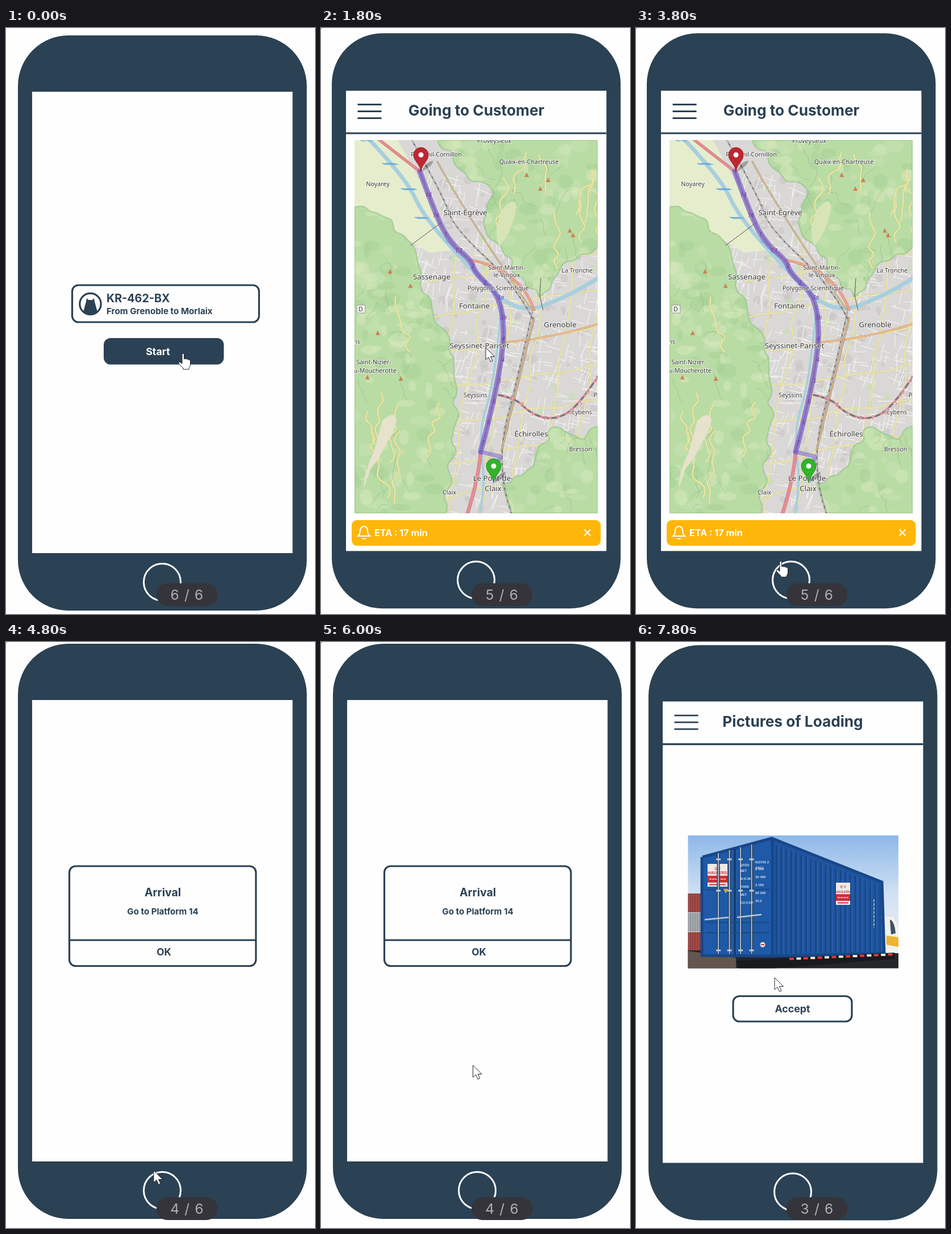
Animation, 544 px wide and 1030 px high, one loop 8000 ms. Source, as an HTML page:

```html
<!DOCTYPE html>
<html lang="en">
<head>
<meta charset="utf-8">
<title>Driver app walkthrough</title>
<style>
html, body { margin: 0; width: 100%; height: 100%; overflow: hidden; background: #fefefe; }
svg { display: block; width: 544px; height: 1030px; }
text { font-family: Inter, sans-serif; font-weight: 650; fill: #2b4154; }
.mid { text-anchor: middle; }
.box { fill: none; stroke: #2b4154; stroke-width: 3.2; }
.badge { font-size: 24.5px; font-weight: 400; letter-spacing: 1.2px; fill: #aeb0b6; text-anchor: middle; }
.map path { fill: none; stroke-linejoin: round; stroke-linecap: round; }
.map text { font: 10.7px "Noto Sans", sans-serif; fill: #3c3c3c; text-anchor: middle; paint-order: stroke; stroke: #ffffffa0; stroke-width: 2px; }
.map .town { font-size: 13.2px; }
.map .road { font-size: 10px; font-style: italic; fill: #c5404d; }
.map .route { font-size: 10px; font-style: italic; fill: #763a9c; stroke: none; }
.photo text { font: 700 6px "Liberation Sans", sans-serif; fill: #d6e3f2; }
.photo .sign { fill: #c8323c; text-anchor: middle; }
</style>
</head>
<body>
<svg id="stage" viewBox="0 0 544 1030"></svg>
<script>
const NAVY = '#2b4154', LOOP = 8000, STEP = 200;

let seed = 11;
const random = () => (seed = (seed * 16807) % 2147483647) / 2147483647;
const between = (a, b) => Math.round((a + (b - a) * random()) * 10) / 10;
const repeat = (n, make) => Array.from({ length: n }, (_, i) => make(i)).join('');
const mix = (a, b, k) => a + (b - a) * k;
const points = s => s.split(' ').map(p => p.split(',').map(Number));

// Smooth curve through the midpoints of a polyline.
function curve(s) {
  const p = points(s), last = p.length - 1;
  let d = `M${p[0]}`;
  for (let i = 1; i < last; i++) {
    const end = i === last - 1 ? p[last] : [mix(p[i][0], p[i + 1][0], .5), mix(p[i][1], p[i + 1][1], .5)];
    d += `Q${p[i]} ${end}`;
  }
  return d;
}

// Position at the fraction k of a polyline's length.
function along(s, k) {
  const p = points(s);
  const lengths = p.slice(1).map((q, i) => Math.hypot(q[0] - p[i][0], q[1] - p[i][1]));
  let rest = k * lengths.reduce((a, b) => a + b), i = 0;
  while (i < lengths.length - 1 && rest > lengths[i]) rest -= lengths[i++];
  return [0, 1].map(axis => mix(p[i][axis], p[i + 1][axis], rest / lengths[i]));
}

// Adds random sideways bends to a polyline.
function winding(s, amount, spacing = 10) {
  const p = points(s), out = [p[0]];
  for (let i = 1; i < p.length; i++) {
    const [x, y] = p[i - 1], dx = p[i][0] - x, dy = p[i][1] - y;
    const length = Math.hypot(dx, dy), n = Math.max(2, Math.round(length / spacing));
    for (let k = 1; k <= n; k++) {
      const side = k < n ? between(-amount, amount) / length : 0;
      out.push([x + dx * k / n - dy * side, y + dy * k / n + dx * side].map(v => v.toFixed(1)));
    }
  }
  return out.join(' ');
}

const stroke = (d, color, width, extra = '') => `<path d="${d}" stroke="${color}" stroke-width="${width}" ${extra}/>`;
const cased = (s, color, width, edge) => stroke(curve(s), edge, width + 1.2) + stroke(curve(s), color, width);
const write = (x, y, size, text, cls = 'mid', color = NAVY) =>
  `<text x="${x}" y="${y}" font-size="${size}" class="${cls}" style="fill:${color}">${text}</text>`;

const phone = (dx, dy, screenTop = 112) => `<g transform="translate(${dx} ${dy})">
  <rect x="21" y="13" width="508.5" height="1011" rx="89" fill="${NAVY}"/>
  <rect x="46" y="${screenTop}" width="458.5" height="${923 - screenTop}" fill="#fefefe"/>
  <circle cx="275" cy="974" r="32.5" fill="none" stroke="#fff" stroke-width="3"/></g>`;

const header = (x, y, titleX, title) => `
  <path d="M${x} ${y}h458.5" class="box"/>
  <path d="M${x + 20.5} ${y - 50.5}h42m-42 12h42m-42 12h42" class="box" style="stroke-width:2.8"/>
  ${write(titleX, y - 31, 26.2, title)}`;

const badge = n => `<rect x="265" y="976" width="107" height="40" rx="19" fill="#34343a"/>
  <text x="319" y="1004.5" class="badge">${n} / 6</text>`;

const villages = `305,202 Proveysieux|203,226 Fontanil-Cornillon|366,239 Quaix-en-Chartreuse|100,278 Noyarey|
  327,425 Saint-Martin-|327,438 le-Vinoux|312,461 Polygone Scientifique|451,430 La Tronche|63,555 ns|
  93,591 Saint-Nizier-|92,606 du-Moucherotte|272,649 Seyssins|459,679 Eybens|483,649 P|457,744 Bresson|226,820 Claix|70,498 D`;
const towns = `254,329 Saint-Égrève|195,442 Sassenage|270,493 Fontaine|421,526 Grenoble|279,563 Seyssinet-Pariset|
  370,718 Échirolles|303,796 Le Pont-de-|303,814 Claix`;

const labels = (list, cls) => list.split('|').map(entry => {
  const [, x, y, name] = entry.trim().match(/^(\d+),(\d+) (.*)$/);
  return `<text x="${x}" y="${y}" class="${cls}">${name}</text>`;
}).join('');

const numbersAlong = (path, list, cls, from) => list.split(' ').map((n, i, all) => {
  const [x, y] = along(path, mix(from, .97, i / (all.length - 1)));
  return `<text x="${x}" y="${y + 4}" class="${cls}">${n}</text>`;
}).join('');

const pin = (x, y, color, edge) => `<g transform="translate(${x} ${y})">
  <path d="M2 0q4 -15 19 -19q2 8 -19 19" style="fill:#0004"/>
  <path d="M0 0C-2 -14 -13 -18 -13 -29a13 13 0 0 1 26 0C13 -18 2 -14 0 0Z" style="fill:${color}" stroke="${edge}"/>
  <circle cy="-29" r="4.5" fill="#fff"/></g>`;

function mapView() {
  const route = '174,252 204,335 230,380 264,408 272,432 322,478 320,600 281,745';
  const isere = '86,197 150,265 180,330 260,420 345,505 440,470 487,440';
  const ring = '313,645 345,652 365,675 405,690 450,670 487,613';
  const region = (edge, corners) => curve(winding(edge, 9, 14)) + corners + 'Z';
  const woods = region('59,315 110,332 165,385 175,450 235,580 235,700 220,853', 'H59')
    + region('205,197 255,255 305,290 290,355 382,475 430,410 487,385', 'V197')
    + region('318,800 375,770 410,700 460,725 487,700', 'V853H335');

  // Town: small blocks, a street grid at two headings, and yellow avenues.
  const blocks = repeat(180, () => `<circle cx="${between(180, 487)}" cy="${between(250, 850)}" r="${between(3, 9)}" fill="${random() < .3 ? '#c7dfb2' : '#c9c6c5'}" opacity=".6"/>`);
  const streets = repeat(650, () => {
    const heading = (random() < .5 ? .2 : 1.8) + between(-.2, .2), r = between(8, 34);
    return `M${between(160, 487)} ${between(250, 853)}l${Math.cos(heading) * r} ${Math.sin(heading) * r}`;
  });
  const avenues = repeat(14, i => {
    const x = 220 + i * 26, y = 390 + i * 32;
    return cased(winding(i % 2 ? `190,${y + 25} 487,${y - 25}` : `${x + 25},380 ${x - 45},853`, 7, 35), '#f3efab', 1.7, '#cdc69a');
  });

  // Mountains: mottled trees, contour trails, clearings and bending roads.
  const trees = repeat(420, () => `<ellipse cx="${between(59, 487)}" cy="${between(197, 853)}" rx="${between(4, 18)}" ry="${between(4, 14)}" fill="${['#a6d196', '#c9e3b3', '#dae9bf'][Math.floor(random() * 3)]}" opacity=".5"/>`);
  const trails = repeat(70, () => {
    const x = between(59, 480), y = between(200, 850);
    return stroke(curve(winding(`${x},${y} ${x + between(-45, 45)},${y + between(20, 55)}`, 7)), '#83a578', .7, 'opacity=".65"');
  });
  const climbs = repeat(16, i => {
    const east = i % 2, x = between(...(east ? [290, 480] : [70, 235])), y = between(...(east ? [190, 340] : [380, 720]));
    return cased(winding(`${x},${y} ${x + between(-30, 40)},${y + between(70, 130)}`, 11, 12), '#f3efa3', 1.8, '#cbc58d');
  });
  const peaks = repeat(10, i => `<path d="M${between(...(i % 2 ? [330, 480] : [65, 160]))} ${between(...(i % 2 ? [240, 440] : [375, 800]))}l4 8h-8z" style="fill:#cf814f"/>`);
  const marsh = repeat(70, () => {
    const [x, y] = along(isere, between(0, .36));
    return `M${x + between(-18, 6)} ${y}l${between(4, 9)} 2`;
  });
  const rail = ['160,197 218,300 233,350 345,455 375,515', '372,500 350,600 306,770 335,853']
    .map(s => stroke(curve(s), '#777', 2.4) + stroke(curve(s), '#e7e4df', 1.1, 'stroke-dasharray="6 5"')).join('');

  return `<clipPath id="frame"><rect x="59" y="197" width="428" height="656"/></clipPath>
  <clipPath id="woods"><path d="${woods}"/></clipPath>
  <g class="map" clip-path="url(#frame)">
  <rect x="59" y="197" width="428" height="656" fill="#dad8d7"/>
  ${blocks}${stroke(streets, '#f6f5f3', 1.1)}${avenues}
  <path d="M59 197H135L200 315 235 390 190 395 59 315Z" style="fill:#e6edcd"/>
  <path d="${woods}" style="fill:#b9dca5"/>
  <g clip-path="url(#woods)">${trees}${trails}${climbs}${peaks}</g>
  ${stroke(woods, '#86bd7b', 2.5, 'opacity=".5"')}
  <path d="M108 690q22 -20 25 0q-5 25 -18 40q-10 25 -28 45l-12 35q2 -35 18 -65z" style="fill:#e6e2cb"/>
  <path d="M318 320q24 -28 26 -5q-8 45 -30 68q-12 -22 4 -63z" style="fill:#d8e4b8"/>
  ${stroke(curve(isere), '#a8cfdd', 7)}${stroke(curve('318,488 306,620 277,710 290,800 280,853'), '#a8cfdd', 4)}
  ${stroke(marsh, '#6aabd9', 1.2)}${rail}
  ${cased('320,553 410,545 487,520', '#f0bd8a', 2.2, '#c5976d')}
  ${cased('375,510 355,590 318,742', '#efc08a', 2, '#75695d')}
  ${cased('205,235 250,320 372,497', '#e8c891', 1.6, '#8d8476')}
  ${cased('98,193 135,222 174,252', '#e58d94', 4, '#c96975')}
  ${cased('264,408 350,425 375,495', '#eba58e', 3.5, '#ca7968')}
  ${cased('281,745 278,790 258,853', '#e58d94', 5, '#c96975')}
  ${stroke(curve(ring), '#d88b91', 4)}${stroke(curve(ring), '#777', 3, 'stroke-dasharray="7 8"')}
  ${stroke('M158 382L213 341M387 440l-2 30 6 26', '#555', 1)}
  ${stroke(curve(route), '#705bc8', 9.5, 'opacity=".68"')}
  ${stroke(curve(route), '#8250aa', 3, 'opacity=".5"')}
  ${stroke('M281 745L315 753 304 794', '#7667cf', 7, 'opacity=".55"')}
  <rect x="63" y="487" width="15" height="14" rx="2" fill="#eef0e5" stroke="#999"/>
  ${labels(villages, '')}${labels(towns, 'town')}
  ${numbersAlong(route, '14 14 1 1.1 2 2 3a 3b 4 4 5 6 6 7', 'route', .08)}
  ${numbersAlong(ring, '8 8 1 7 7 6 5 5 4', 'road', .1)}
  ${pin(176, 252, '#bf2631', '#93202a')}${pin(304, 799, '#31b327', '#278e25')}</g>`;
}

function containerPhoto() {
  const ribs = repeat(22, i => {
    const k = (i + .6) / 22, x = mix(242, 433, k), top = mix(355, 430, k), bottom = mix(548, 543, k);
    return stroke(`M${x} ${top}V${bottom}`, '#174584', 2.8 - k) + stroke(`M${x + 3} ${top}V${bottom}`, '#2b63ae', 1);
  });
  const rods = repeat(4, i => {
    const x = 145 + i * 19.5, top = 371 - i * 5;
    return stroke(`M${x} ${top}V548`, '#1a3961', 5) + stroke(`M${x} ${top}V548`, '#aab6be', 2.2)
      + stroke(`M${x - 4} 382h8m-8 55h8m-8 105h8`, '#c3cbd0', 3);
  });
  const lights = repeat(15, i => `<rect x="${270 + i * 12.4}" y="${555 - i * .55}" width="8" height="4" fill="${i % 2 ? '#f4eee9' : '#e5383c'}"/>`);
  const crates = repeat(3, i => `<path d="M91 ${442 + i * 34}h23v33h-23z" fill="${i % 2 ? '#a9afb2' : '#a94b48'}"/>`)
    + repeat(6, i => stroke(`M${92 + i * 4} 442v101`, '#0003', 1.5));
  const stencils = 'NET 2 180|M.G.W. 30 480|TARE 2 180|NET 28 300|CU.CAP. 33.2'.split('|').map((line, i) => {
    const [, name, value] = line.match(/^(\S+) (.*)$/), y = 404 + i * 14;
    return `<text x="183" y="${y}" textLength="">${name}</text><text x="210" y="${y - 3}">${value}</text>`.replace(' textLength=""', '');
  }).join('');
  const sign = (x, y, w, h) => `<g transform="translate(${x} ${y})"><rect width="${w}" height="${h}" fill="#eee9e8"/>
    <rect y="${h * .52}" width="${w}" height="${h * .3}" fill="#cb2e38"/>
    <path d="M3 ${h * .67}h${w - 6}" stroke="#f3b6b5" stroke-width="2" stroke-dasharray="4 1"/>
    <path d="M3 ${h * .91}h${w - 6}" stroke="#c8323c" stroke-width="2"/>
    <text class="sign" x="${w / 2}" y="${h * .24}">Q V</text>
    <text class="sign" x="${w / 2}" y="${h * .46}" style="font-size:${w * .2}px">HAULERS</text></g>`;

  return `<defs><linearGradient id="sky" x2="0" y2="1"><stop stop-color="#8db8e8"/><stop offset=".45" stop-color="#d2e2f4"/><stop offset=".8" stop-color="#e9eef3"/></linearGradient>
  <clipPath id="print"><rect x="91.5" y="340" width="370.5" height="233.5"/></clipPath></defs>
  <g class="photo" clip-path="url(#print)"><rect x="91" y="340" width="372" height="234" fill="url(#sky)"/>
  ${crates}
  <path d="M91 542H462V574H91z" fill="#25262b"/><path d="M91 543l85 12v19H91z" fill="#62564f"/>
  <path d="M436 483h17l9 20v44h-26z" fill="#f1f1ee"/><path d="M447 488q8 2 10 24l-8 2z" fill="#3e5260"/>
  <path d="M441 516l21 3v17l-21 -4z" fill="#edb331"/>
  <path d="M240 345L433 422 437 547 240 552z" fill="#1f559f"/>${ribs}
  <path d="M117 378L239 345 240 553 114 551z" fill="#1f5aa8"/>
  <path d="M117 378L239 345 433 422l4 125L240 552 116 551V378M240 345V552" fill="none" stroke="#174789" stroke-width="5"/>
  <path d="M174 364V550" stroke="#123764" stroke-width="3"/>
  <path d="M122 435h113m-113 58h113m-113 18h113" stroke="#174984" stroke-width="2"/>
  ${sign(126, 390, 35, 40)}${rods}${sign(352, 423, 25, 39)}
  <path d="M121 488l42 -4m15 0l43 -5" stroke="#c0cace" stroke-width="2.5"/>
  <path d="M154 434h8l-4 8z" fill="#e6a52b"/>
  <text x="183" y="394">QXZU</text><text x="209" y="389">410736 2</text><text x="210" y="399">22G1</text>${stencils}
  <circle cx="223" cy="532" r="4.5" fill="#f1dede"/><path d="M220 532h6" stroke="#ca3546" stroke-width="2"/>
  <path d="M419 452v50" stroke="#b8cce2" stroke-width="1.5" stroke-dasharray="5 2"/>
  <path d="M177 560L455 546V557L240 574H180z" fill="#191a1e"/>${lights}</g>`;
}

// Each scene moves its pointer once, from one spot to another.
const scenes = [
  { start: 0, move: [600, 1600], from: [310, 572], to: [288, 562], art: phone(0, 0) + `
    <rect x="116.5" y="452" width="329" height="65" rx="11" class="box"/>
    <circle cx="148.5" cy="485" r="18.7" class="box"/>
    <path d="M142 475l3 3h7l3 -3 1 6 5 18q-12 8 -25 0l5 -18z" fill="${NAVY}"/>
    ${write(177, 481.5, 19.7, 'KR-462-BX', '')}${write(177, 502.5, 15.2, 'From Grenoble to Morlaix', '')}
    <rect x="172" y="545" width="211.5" height="46.5" rx="12" fill="${NAVY}"/>
    ${write(267.5, 574.5, 17.8, 'Start', 'mid', '#fff')}` + badge(6) },
  { start: 1800, move: [2200, 3600], from: [290, 562], to: [253, 937],
    art: phone(-2, -3.7, 114) + header(44, 185, 273.5, 'Going to Customer') + mapView() + `
    <rect x="54" y="865" width="438.5" height="45" rx="9" fill="#ffb60a"/>
    <path d="M65 893q4 -3 4 -10a6.5 7 0 0 1 13 0q0 7 4 10zM72 897q3.5 2 7 0M463.5 881.5l11 11m0 -11l-11 11" fill="none" stroke="#fff" stroke-width="2"/>
    ${write(94, 893, 16.2, 'ETA : 17 min', '', '#fff')}` + badge(5) },
  { start: 4800, move: [5400, 6600], from: [260, 929], to: [275, 559], art: phone(0, -10) + `
    <rect x="111.5" y="394" width="328.5" height="175.5" rx="11" class="box"/>
    <path d="M111.5 524h328.5" class="box"/>
    ${write(276, 447, 19.5, 'Arrival')}${write(276, 479, 15.1, 'Go to Platform 14')}${write(278, 550.5, 17.3, 'OK')}` + badge(4) },
  { start: 7400, move: [7200, 7800], from: [275, 559], to: [244, 590],
    art: phone(1, -7.5) + header(47, 179.7, 276, 'Pictures of Loading') + containerPhoto() + `
    <rect x="171" y="622.5" width="209" height="44.5" rx="11" class="box"/>
    ${write(275.5, 651, 17.8, 'Accept')}` + badge(3) }
];

document.getElementById('stage').innerHTML = scenes.map(s => `<g class="scene">${s.art}</g>`).join('') + `
  <rect id="dot" width="1" height="1"/>
  <g id="pointer" fill="#fff" stroke="#222a33" stroke-linejoin="round">
  <path id="arrow" d="M0 0V21L5 16.5 8.5 24.5 12 23 8.5 15.5H15.5Z"/>
  <path id="hand" d="M0 2Q0 0 1.7 0T3.5 2V10Q5 8 7 10 9 8.5 10.5 11 14 10 14.5 13V20Q14 24 12 26V28H2V26Q-2 22 -6 17.5 -7 14.5 -4 15L0 18Z"/></g>`;

const groups = document.querySelectorAll('.scene');
const [dot, pointer, arrow, hand] = ['dot', 'pointer', 'arrow', 'hand'].map(id => document.getElementById(id));
const show = (element, visible) => element.style.display = visible ? '' : 'none';

function draw(now) {
  const t = Math.floor((now % LOOP) / STEP) * STEP;
  const current = scenes.findLastIndex(s => t >= s.start);
  groups.forEach((g, i) => show(g, i === current));

  const { move: [begin, end], from, to } = scenes[current];
  const k = Math.min(1, Math.max(0, (t - begin) / (end - begin))), ease = k * k * (3 - 2 * k);
  pointer.setAttribute('transform', `translate(${mix(from[0], to[0], ease)} ${mix(from[1], to[1], ease)})`);
  const overButton = current === 0 || (current === 1 && k === 1);
  show(hand, overButton);
  show(arrow, !overButton);
  show(dot, t >= 400 && t < 7400);
  requestAnimationFrame(draw);
}
draw(0);
</script>
</body>
</html>
```
